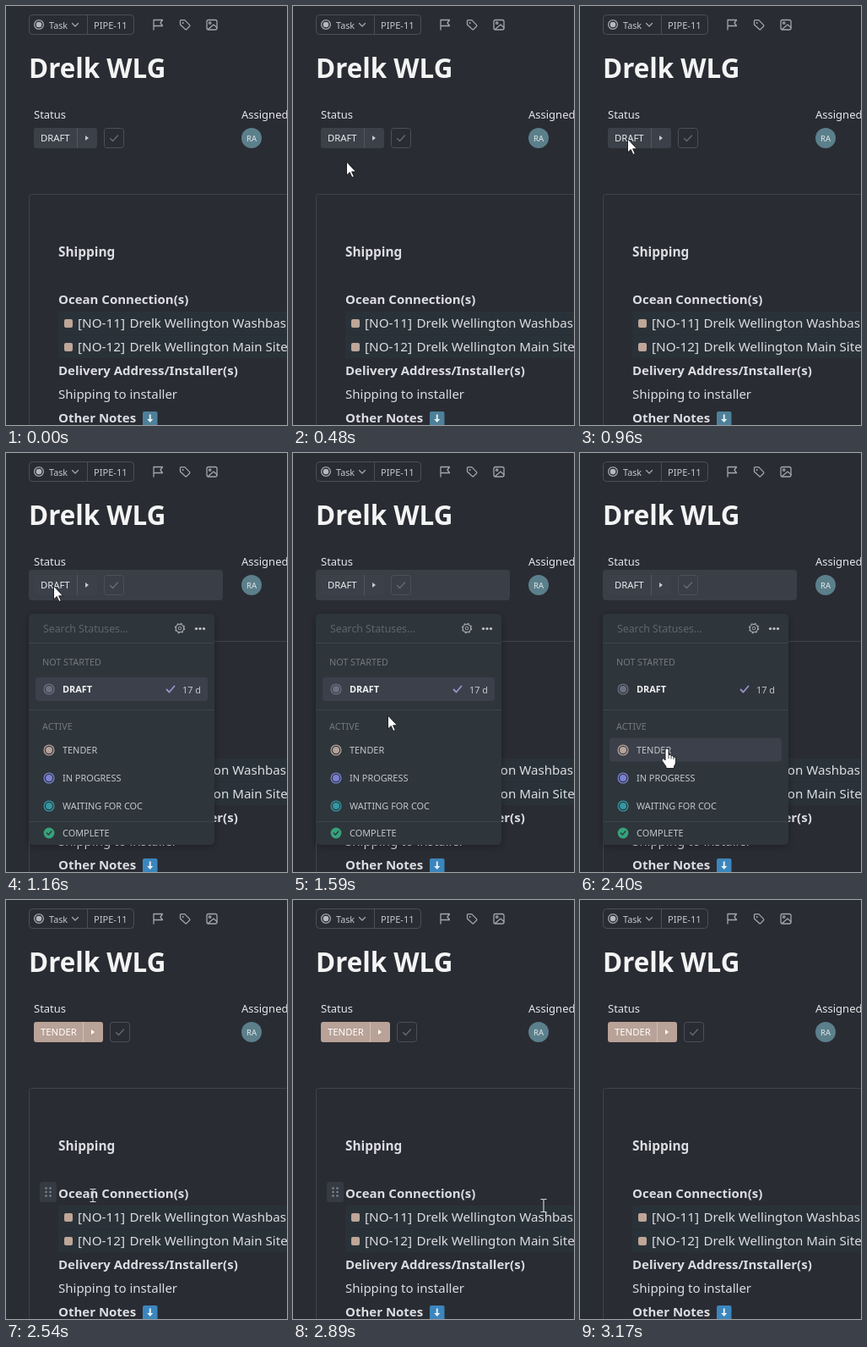
Recreate the animation shown at these times as an HTML page. Size 333 by 495 pixels, loop 3.9 s.

```html
<!DOCTYPE html>
<html lang="en">
<head>
<meta charset="utf-8">
<title>Status change</title>
<style>
  html, body { margin: 0; width: 100%; height: 100%; overflow: hidden; background: #2a2c33; }
  svg { display: block; width: 100vw; height: 100vh; }
  text { font-family: "Noto Sans", "Open Sans", sans-serif; fill: #dcdde1; white-space: pre; }
  .body { font-size: 15px; }
  .bold { font-weight: 700; }
  .label { font-size: 13px; fill: #e6e7ea; }
  .tag { font-size: 11.3px; fill: #e9eaed; }
  .item { font-size: 10.9px; fill: #c3c6cd; }
  .dim { font-size: 10.8px; fill: #737881; }
  .line { fill: none; stroke: #a3a6ae; stroke-width: 1.3; stroke-linecap: round; stroke-linejoin: round; }
  .rule { stroke: #3d444b; }
</style>
</head>
<body>
<svg viewBox="0 0 333 495" xmlns="http://www.w3.org/2000/svg">
  <defs>
    <filter id="shade" x="-20%" y="-20%" width="140%" height="140%">
      <feDropShadow dx="0" dy="2" stdDeviation="4" flood-color="#000" flood-opacity=".3"/>
    </filter>
  </defs>
  <rect width="333" height="495" fill="#2a2c33"/>

  <!-- toolbar -->
  <rect x="27.5" y="10.5" width="124" height="23" rx="4" fill="none" stroke="#4c4f58"/>
  <path d="M96.5 11V33" stroke="#4c4f58"/>
  <circle cx="39" cy="22" r="5.4" class="line"/>
  <circle cx="39" cy="22" r="3.3" fill="#b5b8be"/>
  <text x="51" y="26.5" font-size="10.8" style="fill:#c6c8ce">Task</text>
  <path d="M78.5 20.5l3.500 3.500 3.500-3.500" class="line"/>
  <text x="104" y="26.5" font-size="11.1" style="fill:#c6c8ce">PIPE-11</text>
  <path d="M175 28V16.500H185.500l-2.500 3.500 2.500 3.500H175" class="line"/>
  <path d="M206.500 17.500v4.500l6 5.400q.8.700 1.600 0l3.400-3.400q.7-.8 0-1.600l-5.700-5.800h-4.300q-1 0-1 .9Z" class="line"/>
  <circle cx="209.7" cy="19.900" r="1" fill="#a3a6ae"/>
  <rect x="238" y="16.500" width="12" height="11.500" rx="2" class="line"/>
  <circle cx="241.700" cy="20" r="1.200" class="line"/>
  <path d="M239.500 27.500l6.500-5.500 4 3.500" class="line"/>

  <text x="27" y="85" class="bold" font-size="31.3" style="fill:#f4f4f5">Drelk WLG</text>

  <!-- fields -->
  <text x="33" y="133" class="label">Status</text>
  <text x="279" y="133" class="label">Assigned</text>
  <circle cx="291" cy="156" r="12" fill="#5b7f8b"/>
  <text x="291" y="159.5" font-size="9.5" text-anchor="middle" style="fill:#e4eaec">RA</text>

  <rect id="field" x="27" y="138" width="230" height="36" rx="4" fill="#3a3f47"/>
  <g id="draft">
    <rect x="33" y="144" width="75" height="24" rx="3" fill="#3b4049"/>
    <path d="M84.5 144V168" stroke="#50555e"/>
    <text x="41" y="160" class="tag">DRAFT</text>
  </g>
  <g id="tender">
    <rect x="33" y="144" width="82" height="24" rx="3" fill="#b9a297"/>
    <path d="M91.5 144V168" stroke="#d0bfb6"/>
    <text x="41" y="160" class="tag" style="fill:#fff">TENDER</text>
  </g>
  <g id="tail">
    <path id="tri" d="M94 153l4 3-4 3Z" fill="#c6c9cf"/>
    <rect x="116.5" y="144.500" width="23" height="23" rx="3" fill="none" stroke="#4b4f58"/>
    <path d="M123.500 156.500l3 3 6-6.500" class="line" style="stroke:#666b75"/>
  </g>

  <!-- document -->
  <rect x="27.5" y="222.5" width="330" height="300" rx="3" fill="none" stroke="#40434b"/>
  <g id="handle">
    <rect x="40" y="333" width="20" height="24" rx="3" fill="#363a43"/>
    <g id="dots" fill="#858992"></g>
  </g>
  <text x="62" y="296" class="bold" font-size="15.4">Shipping</text>
  <text x="62" y="352" class="body bold">Ocean Connection(s)</text>
  <g id="links"></g>
  <text x="62" y="436" class="body bold">Delivery Address/Installer(s)</text>
  <text x="62" y="464" class="body">Shipping to installer</text>
  <text x="62" y="492" class="body bold">Other Notes</text>
  <rect id="badge" x="162" y="479" width="17.5" height="17.5" rx="2"/>
  <path d="M169.800 482.500h1.900v5.500h2.600l-3.550 4-3.550-4h2.600Z" fill="#e8f0f4"/>

  <!-- menu -->
  <g id="menu">
    <rect x="27" y="190" width="220" height="273" rx="5" fill="#2e353b" filter="url(#shade)"/>
    <text x="44" y="211.5" font-size="12.3" style="fill:#5f666e">Search Statuses...</text>
    <circle cx="206" cy="207" r="4.7" fill="none" stroke="#9da2aa" stroke-width="1.3"/>
    <circle cx="206" cy="207" r="5.6" fill="none" stroke="#9da2aa" stroke-width="1.2" stroke-dasharray="2.2 2.198"/>
    <circle cx="206" cy="207" r="1.8" fill="none" stroke="#9da2aa"/>
    <g fill="#c3c6cc">
      <circle cx="225.5" cy="207.5" r="1.6"/><circle cx="230" cy="207.5" r="1.6"/><circle cx="234.5" cy="207.5" r="1.6"/>
    </g>
    <path d="M27 224.500H247M27 303.500H247M27 435.500H247" class="rule"/>
    <text x="43" y="251" class="dim">NOT STARTED</text>
    <text x="43" y="327" class="dim">ACTIVE</text>
    <rect id="hover" x="35" width="204" height="28" rx="4" fill="#3b404a"/>
    <g id="items"></g>
    <path d="M190.500 279.500l3 3 6-7" class="line" style="stroke:#9794cb;stroke-width:1.8"/>
    <text x="209" y="283.5" class="item">17 d</text>
  </g>

  <!-- pointers, tip at the origin -->
  <g id="arrow"><path d="M.5 0V16L4.200 12.500l2.700 6 2.400-1.100-2.700-5.600h4.900Z" fill="#fff" stroke="#15161a" stroke-width=".9"/></g>
  <g id="hand">
    <path d="M-2 1.800Q-2 0 0 0T2 1.800V7.500Q4.600 6.600 5 8.700 7.500 8 7.900 10 10.400 9.600 10.400 12V17Q10 19.500 8.500 21V23.500H-1V21.500L-5.700 14.700Q-6.500 12.800-5 12T-2 14Z" fill="#fff" stroke="#15161a" stroke-width=".9" stroke-linejoin="round"/>
    <path d="M2 8V12M5 9V12.500M7.900 10V13" stroke="#15161a" stroke-width=".8"/>
  </g>
  <g id="beam"><path d="M-3.500-7.500H-1Q0-7.500 0-6.500 0-7.500 1-7.500H3.500M0-6.500V6.500M-3.500 7.500H-1Q0 7.500 0 6.500 0 7.500 1 7.500H3.500" fill="none" stroke="#d9dade" stroke-width="1.1"/></g>
</svg>
<script>
const $ = id => document.getElementById(id);
const LOOP = 3900, START = 130, STEP = 69;
const HOVER = 1027, OPEN = 1096, PICK = 2476, LEAVE = 3160;

// pointer path: time, x, y
const path = [
  [130, 297, 472], [268, 205, 350], [406, 85, 208], [475, 63, 184],
  [613, 54, 174], [682, 50, 163], [751, 56, 157], [1234, 56, 157],
  [1372, 62, 195], [1579, 112, 310], [1717, 107, 342], [1855, 103, 349],
  [2476, 103, 349], [2545, 130, 343], [2614, 185, 336], [2683, 245, 339],
  [2752, 285, 350], [2821, 296, 358], [2890, 297, 361], [2959, 296, 385],
  [3097, 288, 470], [3166, 284, 500]
];

$('dots').innerHTML = [0, 1, 2, 3, 4, 5].map(i =>
  `<circle cx="${47.5 + i % 2 * 5}" cy="${340.5 + (i >> 1) * 4.5}" r="1.2"/>`).join('');

$('links').innerHTML = [['[NO-11]', 'Washbas'], ['[NO-12]', 'Main Site']].map(([code, place], i) => {
  const y = 361 + i * 28;
  return `<rect x="62" y="${y}" width="271" height="27" fill="#2a3239"/>
    <rect x="69" y="${y + 9}" width="10" height="10" rx="2" fill="#bea698"/>
    <text x="85" y="${y + 19}" font-size="15.3">${code}</text>
    <text x="146.5" y="${y + 19}" font-size="15.1">Drelk Wellington ${place}</text>`;
}).join('');

$('items').innerHTML = [
  ['DRAFT', 279, '#6a7080'], ['TENDER', 351, '#b5a299'], ['IN PROGRESS', 384, '#7b80d2'],
  ['WAITING FOR COC', 417, '#3597a2'], ['COMPLETE', 449, '#36a27a']
].map(([name, y, color], i) => {
  const icon = i < 4
    ? `<circle cx="51" cy="${y}" r="5.9" fill="none" stroke="${color}" stroke-width="1.3"/>
       <circle cx="51" cy="${y}" r="4" fill="${color}"/>`
    : `<circle cx="51" cy="${y}" r="6.4" fill="${color}"/>
       <path d="M48.3 ${y}l2 2 3.5-4" class="line" style="stroke:#2e353b"/>`;
  const style = i ? '' : ' style="font-weight:700;fill:#f2f3f5"';
  return `${icon}<text x="67" y="${y + 4}" class="item"${style}>${name}</text>`;
}).join('');

function pointerAt(t) {
  const i = path.findIndex(p => p[0] > t);
  if (i < 1) return path[i < 0 ? path.length - 1 : 0].slice(1);
  const [a, b] = [path[i - 1], path[i]];
  const k = (t - a[0]) / (b[0] - a[0]);
  return [a[1] + (b[1] - a[1]) * k, a[2] + (b[2] - a[2]) * k];
}

function show(id, on) {
  $(id).style.display = on ? '' : 'none';
}

function draw(time) {
  const t = START + Math.floor((time - START) / STEP) * STEP;
  const [x, y] = pointerAt(t);
  const visible = t >= START && t < LEAVE;
  const picked = t >= PICK;
  const open = t >= OPEN && !picked;
  const onTender = y > 337;
  const onItem = open && (onTender || y > 265 && y < 293);
  const inText = !open && y > 277 && y < 470;

  show('field', t >= HOVER && !picked);
  show('draft', !picked);
  show('tender', picked);
  $('tail').setAttribute('transform', `translate(${picked ? 7 : 0} 0)`);
  $('tri').setAttribute('fill', picked ? '#fff' : '#c6c9cf');
  $('badge').setAttribute('fill', t < OPEN ? '#4d8099' : '#3b86bd');

  show('menu', open);
  $('hover').setAttribute('y', onTender ? 336.5 : 265);

  show('handle', visible && inText);
  $('handle').setAttribute('transform', `translate(0 ${Math.floor((y - 334) / 28) * 28})`);

  const kind = onItem ? 'hand' : inText ? 'beam' : 'arrow';
  for (const id of ['arrow', 'hand', 'beam']) show(id, visible && id === kind);
  $(kind).setAttribute('transform', `translate(${x.toFixed(1)} ${y.toFixed(1)})`);
}

let begin;
function tick(now) {
  begin ??= now;
  draw((now - begin) % LOOP);
  requestAnimationFrame(tick);
}
draw(0);
requestAnimationFrame(tick);
</script>
</body>
</html>
```
